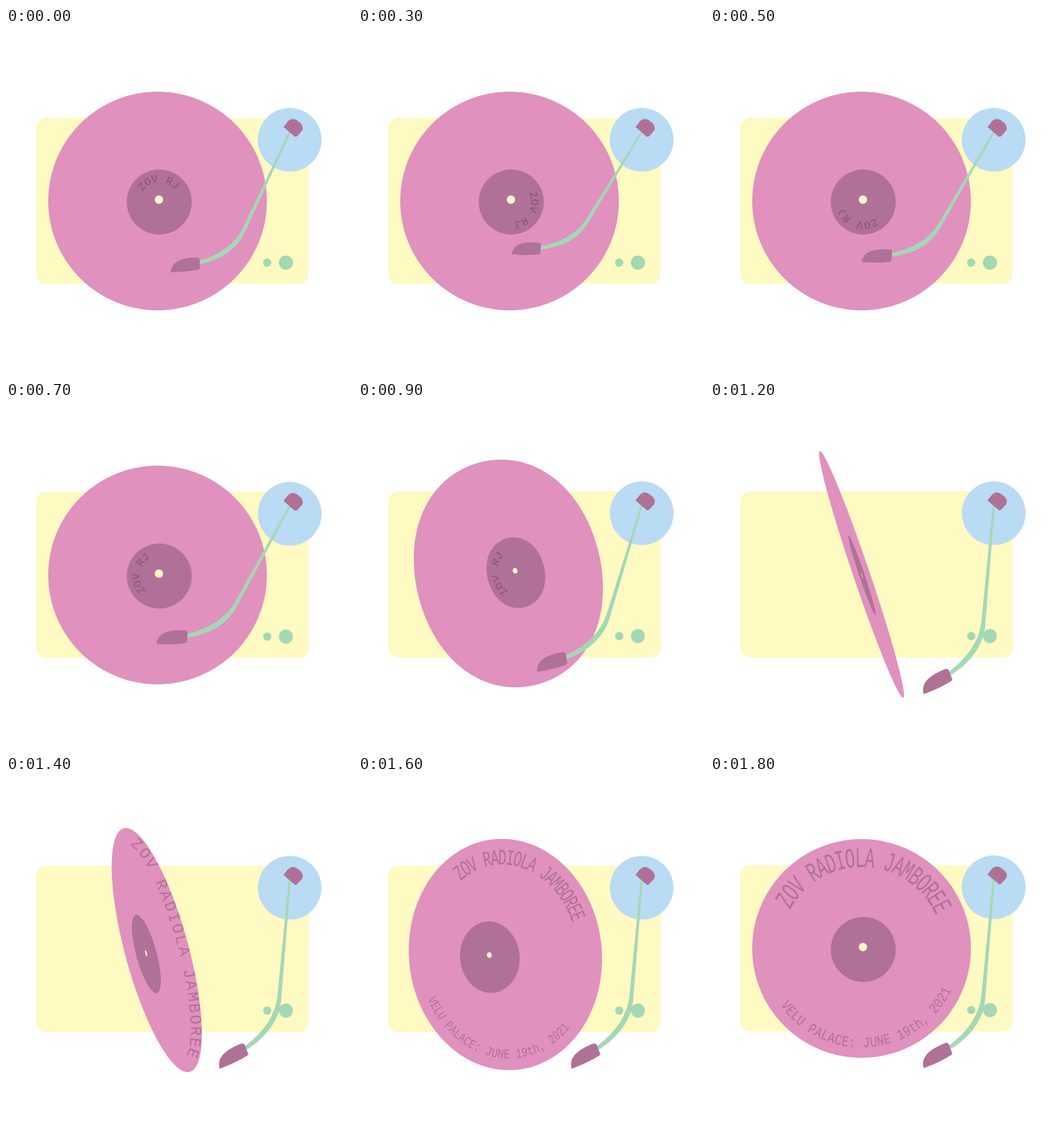
An HTML page with a canvas that plays this animation: 500x500 px, repeating every 1900 ms.

```html
<!DOCTYPE html>
<html lang="en">
<head>
<meta charset="utf-8">
<title>Turntable</title>
<style>
  html, body { margin: 0; width: 100%; height: 100%; overflow: hidden; background: #fff; }
  canvas { display: block; }
</style>
</head>
<body>
<canvas id="stage" width="500" height="500"></canvas>
<script>
const ctx = document.getElementById('stage').getContext('2d');
const LOOP = 1900, STEP = 100, RAD = Math.PI / 180, RADIUS = 158;
const CREAM = '#fff9c2', PINK = '#e091be', PLUM = '#b07196', INK = '#8c5078',
      MINT = '#a4d8b4', SKY = '#b9dbf4';

// Arm poses: time, swing in degrees, reach
const armPoses = [[0, 0, 1], [300, 6.5, .97], [700, 3.7, 1.043], [1100, -20, 1.094]];

const progress = (t, from, to) => Math.min(1, Math.max(0, (t - from) / (to - from)));

function armPose(t) {
  const last = armPoses.length - 2;
  const i = Math.min(last, armPoses.filter(p => p[0] <= t).length - 1);
  const a = armPoses[i], b = armPoses[i + 1], p = progress(t, a[0], b[0]);
  return [1, 2].map(k => a[k] + (b[k] - a[k]) * p);
}

function within(x, y, degrees, draw) {
  ctx.save();
  ctx.translate(x, y);
  ctx.rotate(degrees * RAD);
  draw();
  ctx.restore();
}

function fillPath(color, d) {
  ctx.fillStyle = color;
  ctx.fill(new Path2D(d));
}

function circle(x, y, r, color) {
  ctx.fillStyle = color;
  ctx.beginPath();
  ctx.arc(x, y, r, 0, 7);
  ctx.fill();
}

// Upright ellipse, optionally slightly squared.
function oval(x, y, long, short, color, square = 0) {
  ctx.fillStyle = color;
  ctx.beginPath();
  for (let a = 0; a < 360; a += 2) {
    const r = 1 - square * Math.cos(4 * a * RAD);
    ctx.lineTo(x + short * r * Math.cos(a * RAD), y + long * r * Math.sin(a * RAD));
  }
  ctx.fill();
}

// Letters at equal distances along an ellipse; dir -1 runs along its underside.
function curvedText(text, { long, short, start, advance, size, stretch = 1, dir = 1, color = PLUM }) {
  ctx.font = `${size}px "Liberation Mono", "Courier New", monospace`;
  ctx.textAlign = 'center';
  ctx.fillStyle = color;
  let a = start * RAD;
  const slope = () => [short * Math.cos(a), long * Math.sin(a)];
  for (const ch of text) {
    const [dx, dy] = slope();
    within(short * Math.sin(a), -long * Math.cos(a), Math.atan2(dy * dir, dx * dir) / RAD, () => {
      ctx.scale(1, stretch);
      ctx.fillText(ch, 0, size * .33);
    });
    for (let i = 0; i < 4; i++) a += dir * advance / 4 / Math.hypot(...slope());
  }
}

function drawBase() {
  ctx.fillStyle = CREAM;
  ctx.beginPath();
  ctx.roundRect(44, 130, 393.5, 240, 14);
  ctx.fill();
  circle(377.5, 339, 6, MINT);
  circle(404.5, 339, 10.3, MINT);
  circle(410, 161.5, 46, SKY);
}

// The record turns away until it is edge-on, then comes back with its printed side.
function drawRecord(t) {
  const front = t >= 1200;
  const back = progress(t, 1325, 1725);
  const turn = front ? 1 - back : progress(t, 700, 1275);
  const away = front ? 0 : turn;
  const bump = 6.75 * back * back * (1 - back);

  const tilt = turn * (front ? 18.7 : 40);
  const long = RADIUS + turn * (front ? 30 : 26);
  const short = Math.max(12, RADIUS * Math.cos(turn * 90 * RAD));
  const square = .022 * away;
  const depth = front ? -30 * Math.sin(back * Math.PI) : 25 * turn;
  const label = .297 + .025 * Math.sin(turn * 90 * RAD);
  const hole = turn ? .025 : .038;

  within(219 - 5 * away - 6 * bump, 250 - 4 * away + 8 * bump, -tilt, () => {
    oval(0, 0, long, short, PINK, square);
    if (back > 0) {
      curvedText('ZOV RADIOLA JAMBOREE', {
        long: long * (.83 + .12 * turn * turn), short: short * .83,
        start: 38 - 96 * back, advance: 14.5 + 4 * turn - 4.5 * bump,
        size: 24 - 4 * bump, stretch: 1.7 - 1.07 * turn * turn
      });
    }
    if (t >= 1500) {
      curvedText('VELU PALACE: JUNE 19th, 2021', {
        long: long * .86, short: short * .86,
        start: 233 + 47 * turn, advance: 10.2 - 1.5 * bump,
        size: 17 - 2 * bump, stretch: 1.25, dir: -1
      });
    }

    const flat = short / RADIUS;
    ctx.translate(depth + 2.5 * flat, 1.5);
    oval(0, 0, long * label, short * label, PLUM, square);
    oval(-.5 * flat, -3.5 * flat, long * hole, short * hole, CREAM);
    if (!front) {
      ctx.scale(short * label / 47, long * label / 47);
      curvedText('ZOV RJ', {
        long: 34, short: 34, start: 40 * Math.min(t, 700) / STEP - 48,
        advance: 10.9, size: 15.5, color: INK
      });
    }
  });
}

function drawArm(t) {
  const [swing, reach] = armPose(t);
  within(410, 150.5, swing, () => {
    ctx.scale(reach, reach);
    fillPath(MINT, 'M-1.2-.5L-67.5 138Q-84 172-131 186L-129 191Q-78 179-62.5 140L1.2 .5Z');
    ctx.translate(-130, 188.5);
    fillPath(PLUM, 'M-42 13.5C-41 0-29-7-4-7.5Q-1-7.5 0-4L0 8Q0 9.5-2 10Q-17 13.5-41 14Q-42 14-42 13.5Z');
  });
  fillPath(PLUM, 'M401 143L406 136.5Q413 127.5 422 134.5Q431.5 141 428 148.5L421 156Q418.5 158.5 416 156Z');
}

function frame(now) {
  const t = Math.floor(now % LOOP / STEP) * STEP;
  const lift = (t >= 800 && t < 1300) || t >= 1700 ? -.8 : 0;
  ctx.clearRect(0, 0, 500, 500);
  within(0, lift, 0, () => {
    drawBase();
    drawRecord(t);
    drawArm(t);
  });
  requestAnimationFrame(frame);
}
frame(0);
</script>
</body>
</html>
```
